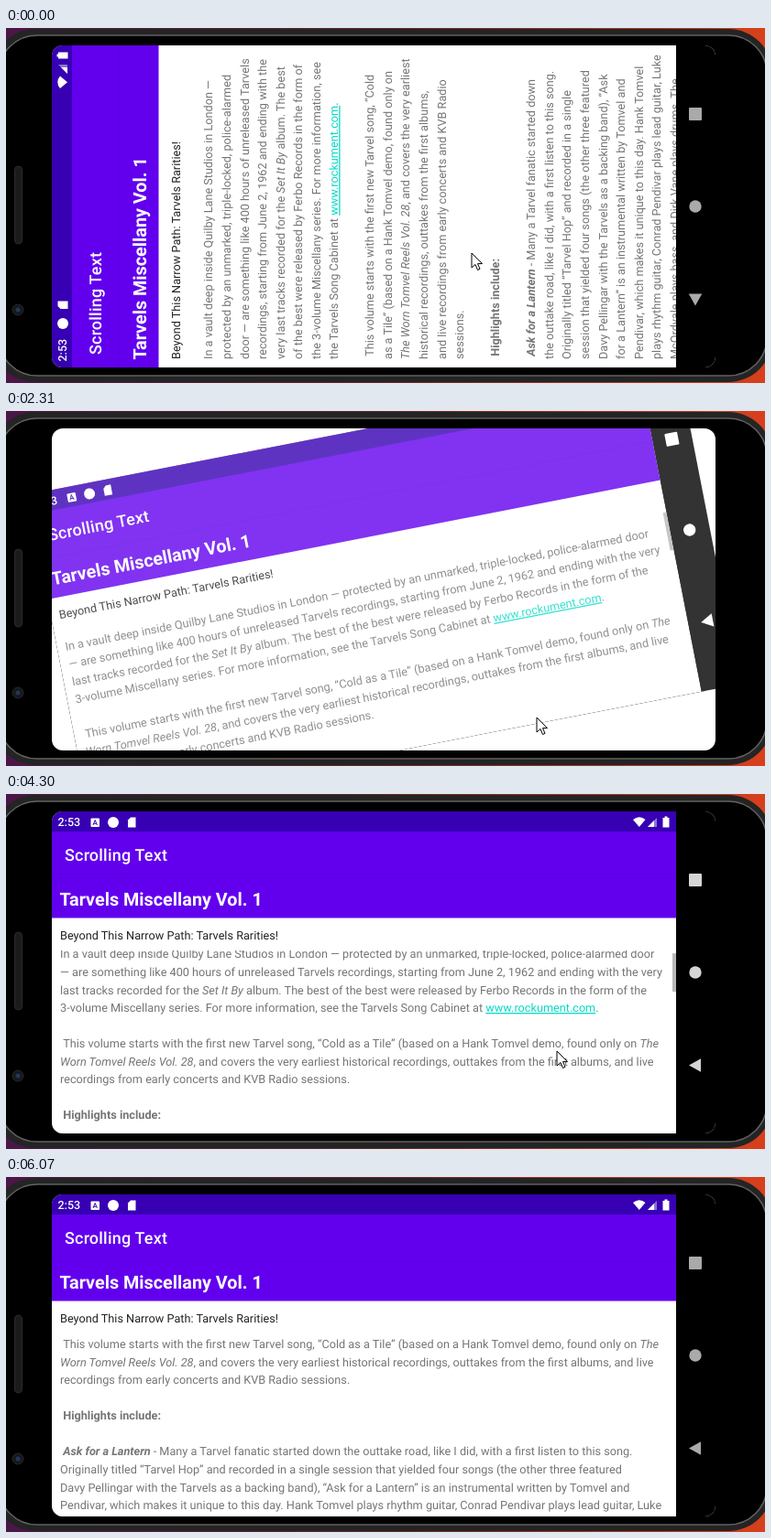
Write an HTML page that moves like this. It is 828 px wide and 388 px high and loops after 6.85 s.

```html
<!DOCTYPE html>
<html lang="en">
<head>
<meta charset="utf-8">
<title>Scrolling Text</title>
<style>
html, body { margin: 0; width: 100%; height: 100%; overflow: hidden; background: #000; }
svg { display: block; }
text { font: 12.7px Roboto, sans-serif; fill: #757575; text-rendering: geometricPrecision; }
.i { font-style: italic; }
.b { font-weight: 700; }
.a { fill: #03dac5; text-decoration: underline; }
.clock { font-size: 12.5px; font-weight: 500; fill: #fff; }
.bar { font-size: 17.93px; font-weight: 500; letter-spacing: .0125em; fill: #fff; }
.title { font-size: 19.8px; font-weight: 700; fill: #fff; }
.sub { fill: #222; }
</style>
</head>
<body>
<svg id="stage" width="828" height="388" viewBox="0 0 828 388"></svg>
<script>
// "|" breaks a line in portrait, "~" in landscape, a newline in both
const article = `In a vault deep inside Quilby Lane Studios in London —|protected by an unmarked, triple-locked, police-alarmed|door~— are something like 400 hours of unreleased Tarvels|recordings, starting from June 2, 1962 and ending with the|very~last tracks recorded for the <i>Set It By</i> album. The best|of the best were released by Ferbo Records in the form of|the~3-volume Miscellany series. For more information, see|the Tarvels Song Cabinet at <a>www.rockument.com</a>.

\u00a0This volume starts with the first new Tarvel song, “Cold|as a Tile” (based on a Hank Tomvel demo, found only on|<i>The</i>~<i>Worn Tomvel Reels Vol. 28</i>, and covers the very earliest|historical recordings, outtakes from the first albums,|and live~recordings from early concerts and KVB Radio|sessions.

\u00a0<b>Highlights include:</b>

\u00a0<b><i>Ask for a Lantern</i></b> - Many a Tarvel fanatic started down|the outtake road, like I did, with a first listen to this song.
Originally titled “Tarvel Hop” and recorded in a single|session that yielded four songs (the other three featured
Davy Pellingar with the Tarvels as a backing band), “Ask|for a Lantern” is an instrumental written by Tomvel and
Pendivar, which makes it unique to this day. Hank Tomvel|plays rhythm guitar, Conrad Pendivar plays lead guitar, Luke
McOrdvale plays bass, and Dirk Vane plays drums. The`;

const PITCH = 19.55;

const lines = (mark, other) => article
  .replaceAll(other, ' ').replaceAll(mark, '\n').split('\n')
  .map((line, i) => `<text x="9" y="${23.4 + i * PITCH}">` +
    line.replace(/<(\w)>/g, '<tspan class="$1">').replace(/<\/\w>/g, '</tspan>') + '</text>')
  .join('');

function statusBar(w, land) {
  const x = land ? 67 : 48;
  return `<rect width="${w}" height="22" fill="#3700b3"/>
    <text class="clock" x="6.5" y="16.4">2:53</text>
    <g fill="#fff">
      ${land ? '<rect x="42.5" y="7.5" width="9.5" height="9.5" rx="1"/><path d="M45 15L47.2 9.5L49.4 15M45.8 13.3H48.6" fill="none" stroke="#3700b3"/>' : ''}
      <circle cx="${x}" cy="12" r="6"/>
      <path d="M${x + 16} 17.5V9.5L${x + 19} 6.5H${x + 24.5}V17.5Z"/>
      <path d="M${w - 47} 9Q${w - 40} 3.5 ${w - 33.5} 9L${w - 40.2} 17Z"/>
      <path d="M${w - 31} 17L${w - 21} 7V17Z" opacity=".45"/>
      <path d="M${w - 31} 17L${w - 24} 10V17Z"/>
      <path d="M${w - 14.5} 7H${w - 12.5}V5.5H${w - 9.5}V7H${w - 7.5}V17.5H${w - 14.5}Z"/>
    </g>`;
}

function screen(id, land) {
  const [w, h] = land ? [681, 352] : [352, 681];
  const [fullW, fullH] = land ? [724, 352] : [352, 724];
  const spots = land ? [[702, 75], [702, 176], [702, 277.5]] : [[277, 702], [176, 702], [74.5, 702]];
  const at = i => `transform="translate(${spots[i]})"`;
  return `<g id="${id}"><g transform="${land ? 'translate(50 19)' : 'translate(50 371) rotate(-90)'}">
    <rect width="${fullW}" height="${fullH}"/>
    <svg width="${w}" height="${h}">
      <rect width="${w}" height="${h}" fill="#fff"/>
      <rect width="${w}" height="116.5" fill="#6200ee"/>
      <rect y="72.5" width="${w}" height="1" fill="#5a00e0"/>
      ${statusBar(w, land)}
      <text class="bar" x="14" y="54.3">Scrolling Text</text>
      <text class="title" x="8.5" y="102.6">Tarvels Miscellany Vol. 1</text>
      <text class="sub" x="9" y="140">Beyond This Narrow Path: Tarvels Rarities!</text>
      <svg y="152" width="${w}" height="${h - 152}">
        <g class="scroll">${land ? lines('~', '|') : lines('|', '~')}</g>
        ${land ? '<rect id="thumb" x="677" width="4" height="42" fill="#b8b8b8"/>' : ''}
      </svg>
    </svg>
    <g class="nav">
      <rect x="-7" y="-7" width="14" height="14" rx="1" ${at(0)}/>
      <circle r="6.7" ${at(1)}/>
      <path d="M-7 0L6 -7.3V7.3Z" ${at(2)}/>
    </g>
  </g></g>`;
}

const stage = document.getElementById('stage');
stage.innerHTML = `
  <defs>
    <linearGradient id="desk"><stop stop-color="#4a1648"/><stop offset=".5" stop-color="#6b2424"/><stop offset="1" stop-color="#d8401c"/></linearGradient>
    <clipPath id="glass"><rect x="50" y="19" width="724" height="352" rx="12"/></clipPath>
  </defs>
  <rect width="828" height="388" fill="url(#desk)"/>
  <rect x="-16" y="1" width="852" height="386" rx="48" fill="#242424"/>
  <rect x="-8" y="8" width="838" height="372" rx="42" stroke="#626262" stroke-width="1.5"/>
  <rect x="9.5" y="151" width="8" height="85" rx="4" fill="#1b1b1b" stroke="#2b2b2b"/>
  <circle cx="13" cy="308" r="6" fill="#16181c" stroke="#25272b"/>
  <circle cx="13" cy="308" r="2.5" fill="#22385c"/>
  <g clip-path="url(#glass)">
    <rect id="paper" x="50" y="19" width="724" height="352" fill="#fff"/>
    ${screen('port', false)}
    ${screen('land', true)}
  </g>
  <rect id="press" x="731" y="26" width="43" height="35" rx="7" fill="#303030"/>
  <g id="turn" fill="none" stroke="#fff" stroke-width="1.7">
    <path d="M749 39.5H758V46M755.5 48.5H746.5V42"/>
    <path d="M755 45.5H761L758 49ZM743.5 42.5H749.5L746.5 39Z" fill="#fff" stroke="none"/>
  </g>
  <path id="cursor" d="M0 0V16L4 12.5L6.5 18.5L9 17.4L6.5 11.6H11.5Z" fill="#fff" stroke="#000"/>`;

const $ = id => document.getElementById(id);
const clamp = v => Math.min(1, Math.max(0, v));
const show = (el, on) => el.setAttribute('visibility', on ? 'visible' : 'hidden');
const alpha = (el, v) => el.setAttribute('opacity', v);
const move = (el, x, y) => el.setAttribute('transform', `translate(${x} ${y})`);
const spin = (el, deg) => el.setAttribute('transform', `rotate(${deg} 412 195)`);

const LOOP = 6850;
// time, then pointer position; the pointer rests where none is given
const steps = [
  [0, 508, 246], [130, 745, 210], [280, 756, 158], [400, 759, 114],
  [540, 756, 98], [660, 755, 84], [780, 755, 72], [900, 755, 62], [1050, 755, 57],
  [1200, 756, 50], [1330, 756, 44], [1480], [1600], [1850, 756, 152], [2000, 580, 331],
  [2160, 579, 335], [2310], [2460], [2910, 612, 338], [3040, 585, 258], [3190, 582, 267],
  [3750, 582, 276], [3890, 588, 280], [4020, 596, 284], [4150, 601, 286], [4300, 601, 281],
  [4450], [4570], [4720, 601, 280], [4870], [4990, 601, 278], [5110], [5230],
  [5380, 601, 284], [5680, 603, 300], [5800, 603, 306], [5950, 580, 331], [6070, -99, -99]
];
const scrolls = [[4300, 15], [4450, 36], [4570, 45], [4870, 51], [4990, 60], [5110, 87], [5230, 105]];

function draw(now) {
  const past = steps.filter(s => s[0] <= now % LOOP);
  const t = past.at(-1)[0];
  const [, x, y] = past.findLast(s => s.length > 1);
  move($('cursor'), x, y);

  // screen rotation: decelerating quarter turn with a cross-fade
  const k = t < 2160 ? 0 : t < 2460 ? (t - 1985) / 500 : 1;
  const p = 1 - (1 - k) ** 2;
  spin($('port'), 90 * p);
  spin($('land'), -90 * (1 - p));
  alpha($('port'), clamp(1 - 2 * k));
  alpha($('land'), clamp(k * 1.23));

  show($('press'), t >= 1480 && t < 2160);
  show($('turn'), t < 2160);
  alpha($('turn'), clamp((t - 400) / 500));

  const grey = t < 1480 ? 170 : t < 2160 ? 228 : 255 - 85 * clamp((t - 3890) / 830);
  for (const nav of document.querySelectorAll('.nav')) nav.setAttribute('fill', `rgb(${grey},${grey},${grey})`);

  const scroll = scrolls.findLast(s => s[0] <= t)?.[1] ?? 0;
  move(document.querySelector('#land .scroll'), 0, -scroll);
  move($('thumb'), 0, scroll * .21);
  alpha($('thumb'), 1 - clamp((t - 4750) / 440));
}

const start = performance.now();
function tick() {
  draw(performance.now() - start);
  requestAnimationFrame(tick);
}
tick();
</script>
</body>
</html>
```
